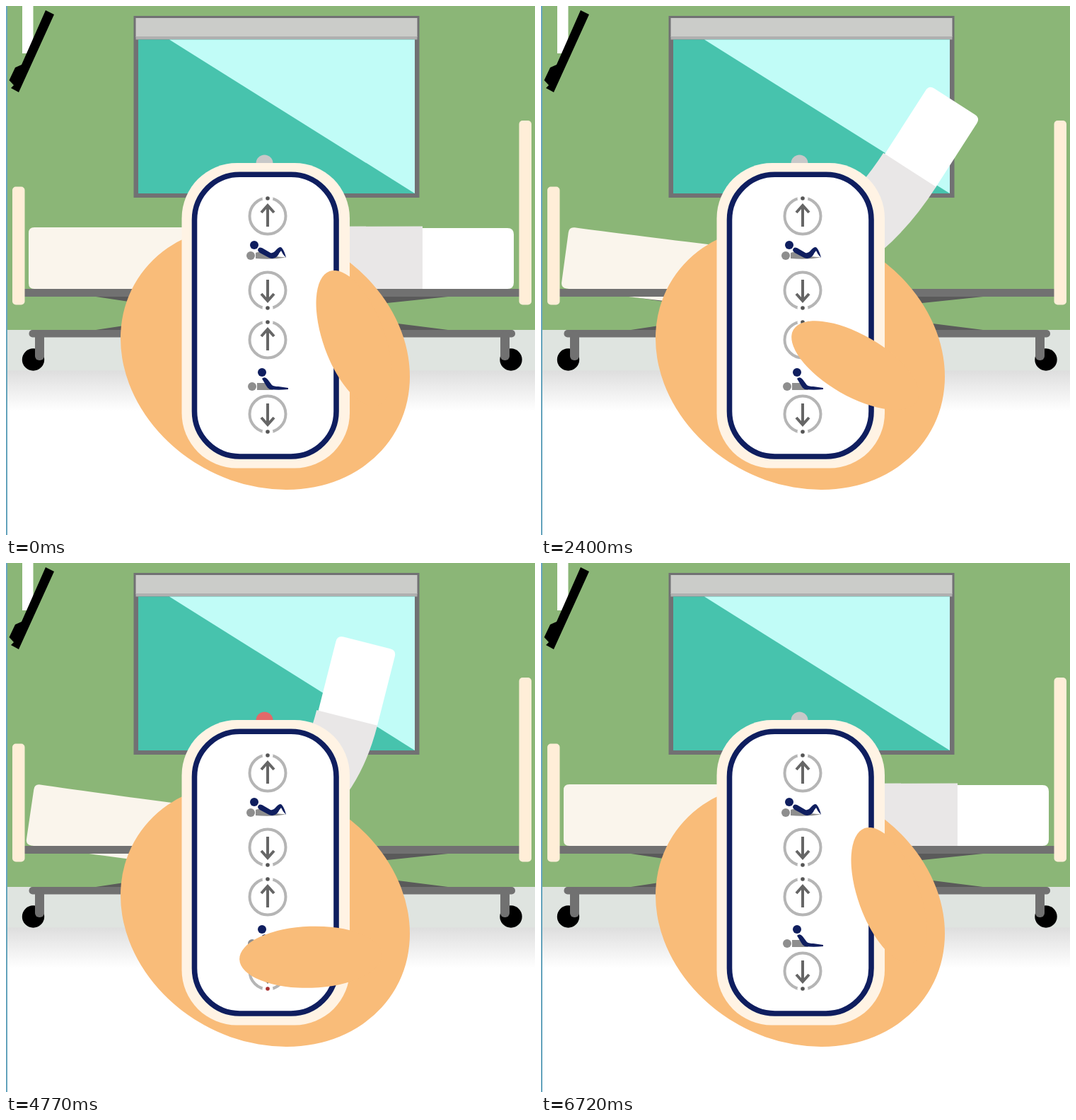
Recreate the animation shown at these times as an HTML page. Size 748x748 px, loop 6960 ms.

```html
<!DOCTYPE html>
<html lang="en">
<head>
<meta charset="utf-8">
<title>Adjustable bed remote</title>
<style>
  html, body { margin: 0; width: 100%; height: 100%; overflow: hidden; background: #fff; }
  svg { display: block; width: 100%; height: 100%; }
</style>
</head>
<body>
<svg viewBox="0 0 748 748">
  <defs>
    <linearGradient id="shade" x1="0" y1="0" x2="0" y2="1">
      <stop offset="0" stop-color="#dedede"/>
      <stop offset="1" stop-color="#fff"/>
    </linearGradient>
    <g id="button">
      <circle r="25.5" fill="none" stroke="#b5b5b5" stroke-width="4"/>
      <circle cy="-25" r="7.5" fill="#fff"/>
      <path d="M0 15V-14M-9-5L0-15L9-5" fill="none" stroke="#666" stroke-width="4"/>
    </g>
  </defs>

  <!-- room -->
  <rect width="748" height="458" fill="#8bb677"/>
  <rect y="458" width="748" height="58" fill="#dfe4e0"/>
  <rect y="515.5" width="748" height="57" fill="url(#shade)"/>
  <rect x="23" width="15.5" height="67" fill="#fff"/>
  <path d="M56 6L68 12L18 122L7 116L11 112L4.500 105L13 87L22 83z"/>

  <!-- window -->
  <rect x="180.500" y="14" width="404" height="257" fill="#717173"/>
  <rect x="183.500" y="17" width="398" height="27" fill="#cbccc9"/>
  <rect x="183.500" y="43" width="398" height="4.500" fill="#b0b0b0"/>
  <rect x="187" y="47.500" width="391" height="217.500" fill="#47c3ad"/>
  <path d="M231 47.500H578V265z" fill="#c1fcf7"/>
  <circle id="lamp" cx="365.500" cy="222.500" r="12"/>

  <!-- bed -->
  <path d="M127 411H200V422zM625 411H500V424zM127 458H200V447zM625 458H530V446z" fill="#5a5a5a"/>
  <path id="foot" fill="#faf5ec"/>
  <path id="head" fill="#fff"/>
  <path id="middle" fill="#e9e7e7"/>
  <rect x="26" y="400" width="701" height="11" fill="#717171"/>
  <g fill="#ffeed8">
    <rect x="9" y="255.500" width="17.500" height="167" rx="5"/>
    <rect x="725.500" y="162" width="17.500" height="260.500" rx="5"/>
  </g>
  <circle cx="38.500" cy="500" r="15.700"/>
  <circle cx="714" cy="500" r="15.700"/>
  <g fill="#717171">
    <rect x="32.500" y="458" width="687.500" height="10.500" rx="5"/>
    <rect x="41" y="460" width="13" height="41" rx="6"/>
    <rect x="699" y="460" width="13" height="41" rx="6"/>
  </g>

  <!-- hand and remote -->
  <ellipse rx="211.900" ry="178.600" transform="translate(366.500 497) rotate(29.100)" fill="#f9bc79"/>
  <rect x="248.500" y="222" width="237.500" height="431.500" rx="78" fill="#fff3e4"/>
  <rect x="266.500" y="238.300" width="200.500" height="398.700" rx="64" fill="#fff" stroke="#0f1e5f" stroke-width="7.600"/>
  <use href="#button" transform="translate(370 297)"/>
  <use href="#button" transform="translate(370 402) scale(1 -1)"/>
  <use href="#button" transform="translate(370 472)"/>
  <use href="#button" transform="translate(370 577) scale(1 -1)"/>
  <circle cx="370" cy="272" r="2.800" fill="#555"/>
  <circle cx="370" cy="427" r="2.800" fill="#555"/>
  <circle id="upDot" cx="370" cy="447" r="2.800"/>
  <circle id="downDot" cx="370" cy="602" r="2.800"/>
  <g fill="#8e8e8e">
    <circle cx="346" cy="353" r="6"/>
    <path d="M353 349Q360 346 370 353L396 355.500Q376 359 353 357z"/>
    <circle cx="348" cy="538" r="6"/>
    <path d="M355 533H368L378 543H355z"/>
  </g>
  <g fill="#0f1e5f">
    <circle cx="351" cy="338" r="6"/>
    <path d="M356 345Q357 340 362 342L374 349Q378 350 381 346Q387 339 390 342Q394 347 396 356Q391 351 389 346Q387 348 385 352Q380 359 372 356L359 349Q356 347 356 345z"/>
    <circle cx="362" cy="518" r="6"/>
    <path d="M362 527Q366 523 370 528L376 536Q379 538 385 538L399 540V542Q385 543.500 373 542Q370 541 368 537z"/>
  </g>
  <ellipse id="thumb" cx="-80" rx="101" ry="43.500" fill="#f9bc79"/>
  <rect width="2" height="748" fill="#67a5bd"/>
</svg>
<script>
const LOOP = 6960, STEP = 30;
const part = id => document.getElementById(id);
const lamp = part('lamp'), upDot = part('upDot'), downDot = part('downDot');
const foot = part('foot'), head = part('head'), middle = part('middle'), thumb = part('thumb');

// Smooth curve through [x, y] keys without overshoot.
function curve(keys) {
  const secant = i => (keys[i + 1][1] - keys[i][1]) / (keys[i + 1][0] - keys[i][0]);
  const slope = keys.map((_, i) => {
    if (i === 0) return secant(0);
    if (i === keys.length - 1) return secant(i - 1);
    const a = secant(i - 1), b = secant(i);
    return a * b > 0 ? 2 * a * b / (a + b) : 0;
  });
  return x => {
    let i = 0;
    while (i < keys.length - 2 && x > keys[i + 1][0]) i++;
    const [x0, y0] = keys[i], [x1, y1] = keys[i + 1];
    const w = x1 - x0, u = (x - x0) / w, v = 1 - u;
    return y0 * (1 + 2 * u) * v * v + y1 * (3 - 2 * u) * u * u
      + w * u * v * (slope[i] * v - slope[i + 1] * u);
  };
}

const tiltAt = curve([[0, 0], [685, 0], [1260, 8.8], [1830, 31], [2400, 57.3], [2580, 65],
  [3300, 77.5], [3600, 78], [4600, 78], [4710, 77], [5340, 49.5], [6060, 20],
  [6150, 16.3], [6450, 5], [6720, 0], [LOOP, 0]]);
const hingeX = curve([[0, 589], [9, 589], [20, 580.5], [49.5, 531], [57.7, 521], [78, 477.5]]);
const hingeY = curve([[0, 356], [9, 331], [20, 302.5], [49.5, 242.5], [57.7, 231.5], [78, 217.5]]);

const ramp = (t, from, to) => Math.min(1, Math.max(0, (t - from) / (to - from)));
const ease = (t, from, to) => (1 - Math.cos(Math.PI * ramp(t, from, to))) / 2;
const mix = (a, b, u) => a + (b - a) * u;
const blend = (a, b, u) => `rgb(${a.map((c, i) => Math.round(mix(c, b[i], u)))})`;

// Thumb poses: pivot x, pivot y, angle.
const REST = [519.4, 545.2, 70], UP = [513.3, 548.3, 27], DOWN = [510.9, 554.8, -3];
const RED = [251, 10, 10], GREY = [200, 200, 200], DARK = [85, 85, 85];

function drawBed(tilt) {
  const rad = tilt * Math.PI / 180, c = Math.cos(rad), s = Math.sin(rad);
  const x = hingeX(tilt), y = hingeY(tilt);
  // Point at a distance along the backrest and across it.
  const at = (along, across) =>
    `${(x + along * c + across * s).toFixed(2)} ${(y - along * s + across * c).toFixed(2)}`;
  const end = 129 - 20 * (tilt / 78) ** 1.3, r = 9;
  head.setAttribute('d', `M${at(-2, -42)}L${at(end - r, -42)}Q${at(end, -42)} ${at(end, -42 + r)}`
    + `L${at(end, 44 - r)}Q${at(end, 44)} ${at(end - r, 44)}L${at(-2, 44)}z`);
  middle.setAttribute('d', `M${at(0, -44.5)}Q${at(-60, -44.5)} 390 ${312 + tilt / 10}`
    + `V400Q${at(-130, 44)} ${at(0, 44)}z`);

  const lean = 8.4 * (1 - (1 - tilt / 80) ** 2), sag = -0.6 * lean;
  foot.setAttribute('transform', `translate(${32 - lean / 2} ${400 - lean / 5}) rotate(${lean})`);
  foot.setAttribute('d', `M380 ${sag}Q110 0 8 0Q0 0 0-8V-79Q0-87 8-87Q110-87 380 ${sag - 87}z`);
}

function draw(t) {
  drawBed(tiltAt(t));

  const raising = t < 3700;
  const press = raising
    ? ease(t, 420, 1110) - ease(t, 2280, 2995)
    : ease(t, 4190, 4820) - ease(t, 6060, 6690);
  const target = raising ? UP : DOWN;
  const [px, py, angle] = REST.map((v, i) => mix(v, target[i], press));
  thumb.setAttribute('transform', `translate(${px} ${py}) rotate(${angle})`);

  const upGlow = ramp(t, 800, 1040) - ramp(t, 2100, 2340);
  const downGlow = ramp(t, 4650, 4890) - ramp(t, 5880, 6120);
  lamp.setAttribute('fill', blend(GREY, RED, upGlow + downGlow));
  upDot.setAttribute('fill', blend(DARK, RED, upGlow));
  downDot.setAttribute('fill', blend(DARK, RED, downGlow));
}

const start = performance.now();
function tick() {
  const t = (performance.now() - start) % LOOP;
  draw(Math.floor(t / STEP) * STEP);
  requestAnimationFrame(tick);
}
tick();
</script>
</body>
</html>
```
